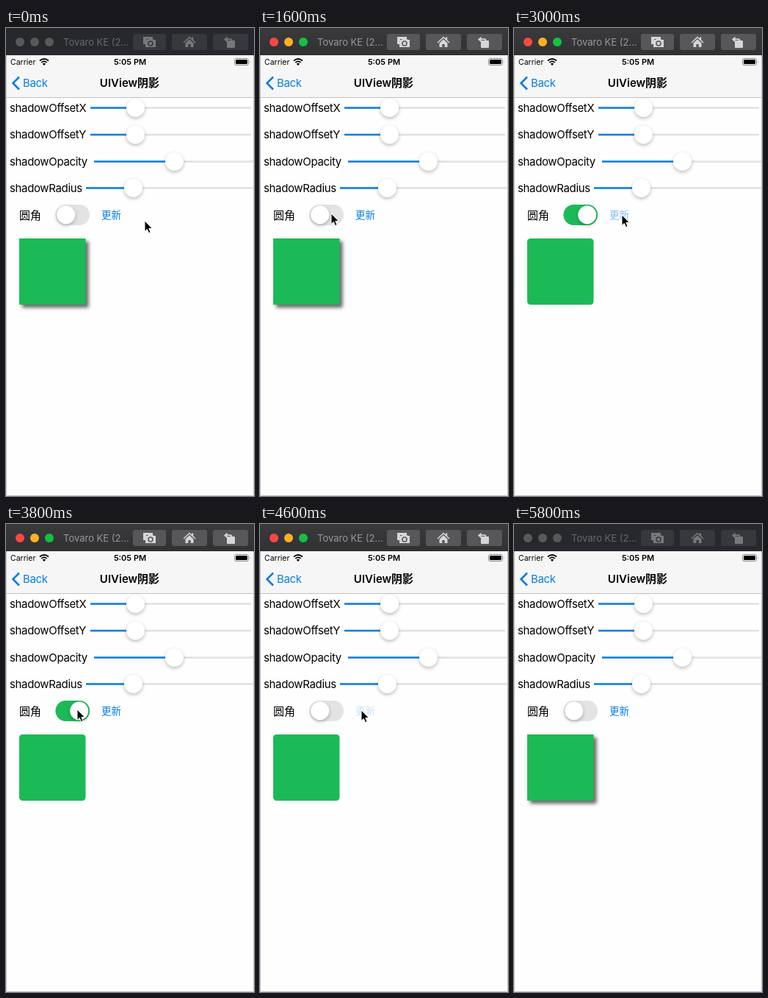
An HTML page for the animation above (6000 ms loop, 338x636 px).

```html
<!DOCTYPE html>
<html lang="zh">
<head>
<meta charset="utf-8">
<title>UIView阴影</title>
<style>
html, body { margin: 0; height: 100%; overflow: hidden; background: #fff; }
svg {
  display: block;
  font: 15px Inter, "Noto Sans CJK SC", "Noto Sans CJK", sans-serif;
  --bar: #27282b; --bar2: #27282b; --button: #37383b; --icon: #77787a; --title: #68696c;
  --red: #59595c; --yellow: #59595c; --green: #59595c;
}
svg.active {
  --bar: #3a3a3d; --bar2: #313134; --button: #57575a; --icon: #d6d6d8; --title: #98989b;
  --red: #fc4943; --yellow: #fdb024; --green: #14c141;
}
.label { letter-spacing: -.35px; }
.blue { fill: #087ee5; }
.bold { font-weight: 600; }
.icon { fill: var(--icon); }
.knob { fill: #fff; filter: drop-shadow(0 2px 2.5px #0004); }
.shade { filter: drop-shadow(4px 4px 2.5px #0009); }
</style>
</head>
<body>
<svg id="stage" width="338" height="636" viewBox="0 0 338 636">
  <defs>
    <linearGradient id="bar" x2="0" y2="1">
      <stop style="stop-color:var(--bar)"/>
      <stop offset="1" style="stop-color:var(--bar2)"/>
    </linearGradient>
  </defs>
  <rect width="338" height="636" fill="#fefefe"/>

  <!-- Window bar -->
  <rect width="338" height="37" fill="url(#bar)"/>
  <circle cx="19" cy="19" r="6" fill="var(--red)"/>
  <circle cx="39" cy="19" r="6" fill="var(--yellow)"/>
  <circle cx="59" cy="19" r="6" fill="var(--green)"/>
  <text x="78" y="24" font-size="13" fill="var(--title)">Tovaro KE (2...</text>
  <g fill="var(--button)">
    <rect x="173" y="8" width="45" height="22" rx="3"/>
    <rect x="226" y="8" width="48" height="22" rx="3"/>
    <rect x="282" y="8" width="48" height="22" rx="3"/>
  </g>
  <g class="icon">
    <path d="M187 12h13v3h-9v7h-4z"/>
    <path d="M190 16h3l1.500-2h5l1.500 2h3v10h-14z"/>
    <circle cx="197" cy="21" r="3" fill="none" stroke="var(--button)" stroke-width="1.500"/>
    <path d="M241.500 19.500 250 11.500l3 2.800V12.500h2.200v3.800l3.300 3.200-1 1-7.500-7-7.500 7z"/>
    <path d="M244.500 20.500 250 15.300l5.500 5.200V26h-3.800v-4h-3.400v4h-3.800z"/>
    <rect x="301" y="17" width="11" height="10" rx="1"/>
    <path d="M297 15.500 301.500 11.500v2.800h4q3 0 3 2.700h-2q0-1-1.500-1h-3.500v3.500z"/>
  </g>

  <!-- Status and navigation -->
  <rect y="37" width="338" height="57" fill="#f6f6f7"/>
  <path d="M0 94.500H338" stroke="#c3c3c5"/>
  <text x="6" y="50" font-size="10.500">Carrier</text>
  <g fill="none" stroke="#000" stroke-width="1.700">
    <path d="M46 44.500q6-5 12 0M48.300 46.900q3.700-3 7.400 0"/>
  </g>
  <path d="M49.800 48.500q2.200-1.700 4.400 0L52 51z"/>
  <text class="bold" x="169" y="50" font-size="11" text-anchor="middle">5:05 PM</text>
  <rect x="311.500" y="41.500" width="19" height="9" rx="2.500" fill="none" stroke="#888"/>
  <rect x="313" y="43" width="16" height="6" rx="1.500"/>
  <path d="M332 44.500q1.500 1.500 0 3z" fill="#888"/>
  <path d="M18 66.500 9.500 75 18 83.500" fill="none" stroke="#087ee5" stroke-width="2.600"/>
  <text class="label blue" x="23" y="80">Back</text>
  <text class="bold" x="168.500" y="80" text-anchor="middle">UIView阴影</text>

  <g id="sliders"></g>

  <text x="18" y="259.500">圆角</text>
  <rect x="67.500" y="240" width="46.500" height="28" rx="14" fill="#e3e3e5"/>
  <rect id="on" x="67.500" y="240" width="46.500" height="28" rx="14" fill="#1cba57"/>
  <circle id="knob" class="knob" cy="254" r="12.500"/>
  <text id="update" class="blue" x="130" y="259" font-size="13.500">更新</text>
  <rect id="square" x="18" y="286" width="90.500" height="90" fill="#1cba57"/>

  <path d="M.5 37V635.500H337.500V37" fill="none" stroke="#c4c4c6"/>
  <path id="cursor" d="M0 0V14.500L3.300 11.500 5.600 16.700 8 15.600 5.800 10.500H10.300Z" stroke="#fff"/>
</svg>
<script>
const $ = id => document.getElementById(id);
const LOOP = 6000, STEP = 200;

// label, row centre, track start, track end, knob
const sliders = [
  ["shadowOffsetX", 108.5, 115, 334, 176.5],
  ["shadowOffsetY", 145, 115, 334, 176.5],
  ["shadowOpacity", 181.5, 120, 340, 229.5],
  ["shadowRadius", 217.5, 109, 340, 173.5],
];
$("sliders").innerHTML = sliders.map(([name, y, start, end, x]) => `
  <text class="label" x="5" y="${y + 5}">${name}</text>
  <path d="M${start} ${y}H${end}" stroke="#e0e0e2" stroke-width="2.5"/>
  <path d="M${start} ${y}H${x}" stroke="#087ee5" stroke-width="2.5"/>
  <circle class="knob" cx="${x}" cy="${y}" r="12.5"/>`).join("");

// Keys start with their time in ms
const cursorKeys = [
  [0, 189, 262], [200, 186, 261], [600, 140, 258], [1200, 140, 258],
  [1600, 97, 252], [2400, 97, 252], [2800, 147, 254], [3200, 147, 254],
  [3800, 97, 252], [4000, 97, 252], [4200, 115, 252], [4400, 138, 253],
  [4800, 138, 253], [5000, 133, 252], [5400, 128, 254],
];
const switchKeys = [ // knob, colour
  [2000, 0, 0], [2200, .7, .4], [2400, 1, 1],
  [4000, 1, 1], [4200, .08, .42], [4400, 0, 0],
];
const updateKeys = [
  [400, 1], [600, .2], [800, .2], [1200, 1],
  [2600, 1], [2800, .2], [3000, .5], [3200, 1],
  [4400, 1], [4600, .2], [4800, .5], [5000, 1],
];

function at(keys, t) {
  const i = keys.findIndex(key => key[0] > t);
  if (i < 1) return (i ? keys.at(-1) : keys[0]).slice(1);
  const a = keys[i - 1], b = keys[i], p = (t - a[0]) / (b[0] - a[0]);
  return a.slice(1).map((v, k) => v + (b[k + 1] - v) * p);
}

function draw(now) {
  const t = Math.floor(now % LOOP / STEP) * STEP;
  const [x, y] = at(cursorKeys, t);
  const [slide, tint] = at(switchKeys, t);
  const rounded = t >= 3000 && t < 4800;

  $("stage").classList.toggle("active", t >= 200 && t < 5800);
  $("cursor").setAttribute("transform", `translate(${x} ${y})`);
  $("cursor").style.opacity = t < 5800 ? 1 : 0;
  $("knob").setAttribute("cx", 81.7 + 18 * slide);
  $("on").style.opacity = tint;
  $("update").style.opacity = at(updateKeys, t)[0];
  $("square").setAttribute("rx", rounded ? 4.5 : 0);
  $("square").classList.toggle("shade", !rounded);
}

const start = performance.now();
function tick() {
  draw(performance.now() - start);
  requestAnimationFrame(tick);
}
tick();
</script>
</body>
</html>
```
